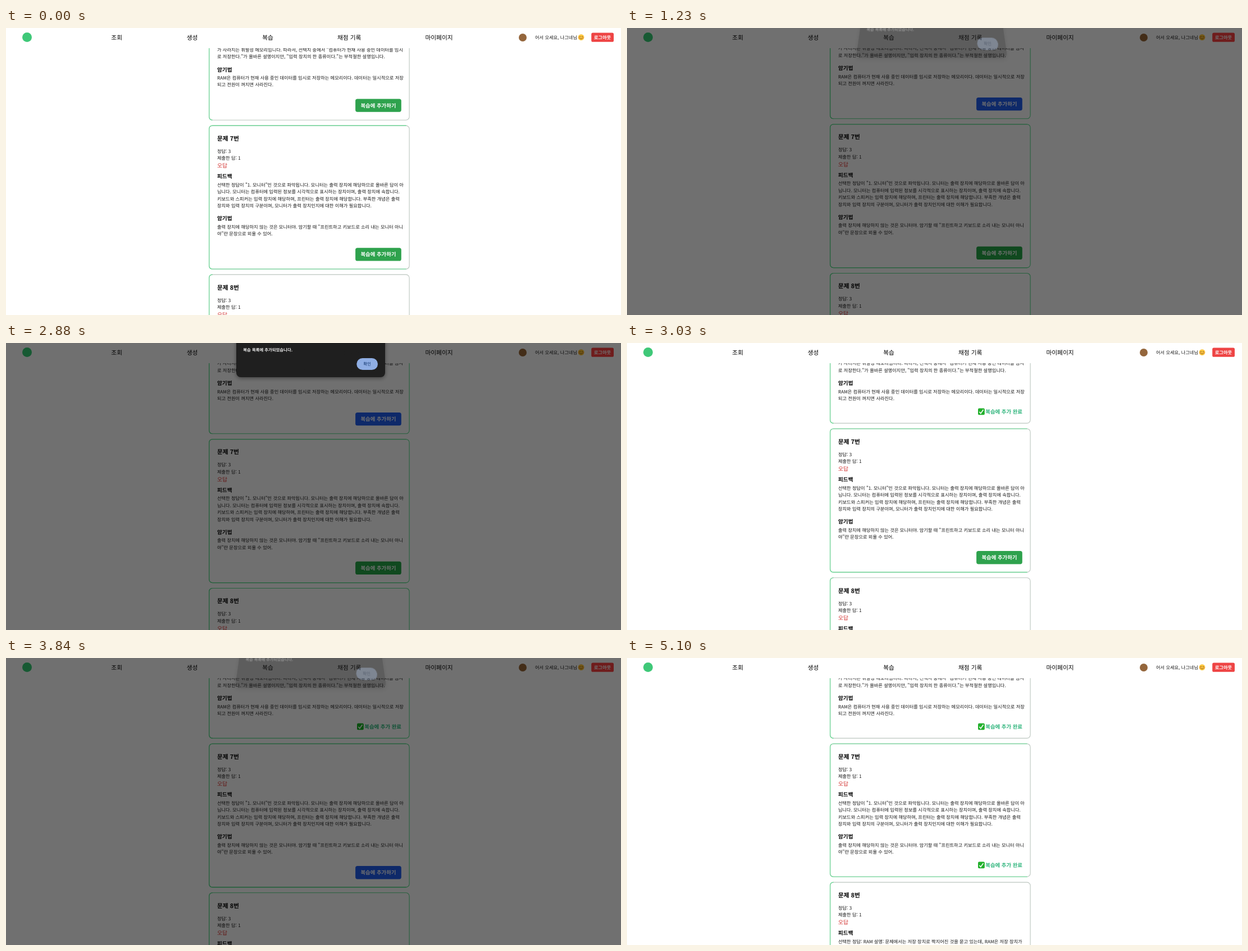
An HTML page for the animation above (6420 ms loop, 1095 px wide and 512 px high).

```html
<!DOCTYPE html>
<html lang="ko">
<head>
<meta charset="utf-8">
<title>채점 기록</title>
<style>
  html, body { margin: 0; width: 100%; height: 100%; overflow: hidden; background: #fff; }
  body, text {
    font-family: "Noto Sans CJK KR", "Noto Sans CJK JP", "Noto Sans CJK SC", "Noto Sans CJK TC", "Noto Sans CJK", sans-serif;
    text-rendering: geometricPrecision;
  }
  #page { position: absolute; left: 0; top: 0; background: #fff; --edge: #bcc6bf; }
  #page.dim { filter: brightness(.44) saturate(1.1); --edge: #62d990; }
  .body { font-size: 8.22px; fill: #181818; }
  .title { font-size: 10.7px; font-weight: 700; fill: #000; }
  .sub { font-size: 9.6px; font-weight: 700; fill: #000; }
  .wrong { font-size: 9.85px; fill: #d23230; }
  .nav { font-size: 10.7px; font-weight: 500; fill: #000; }
  .label { font-size: 9.4px; font-weight: 700; fill: #fff; }
  .done { font-size: 9.4px; font-weight: 700; fill: #2fb57c; }
  .logout { font-size: 8.3px; font-weight: 700; fill: #fff; }
  .frame { fill: none; stroke: var(--edge); stroke-width: 1.1; }
  .frame.green { stroke: #62d990; }
  #dialog {
    position: absolute; left: 410px; top: -60px; width: 264.5px; height: 120.5px;
    border-radius: 8px; background: #1f1f1f; box-shadow: 0 2px 7px #0006;
    transform-origin: 132px 106px; visibility: hidden;
  }
  #dialog svg { position: absolute; left: 0; top: 0; }
  .message { font-size: 7.36px; font-weight: 700; fill: #f2f2f2; }
  .confirm { font-size: 7.5px; font-weight: 500; fill: #0b2f68; }
</style>
</head>
<body>
<svg id="page" width="1095" height="512" viewBox="0 0 1095 512">
  <g id="cards"></g>
  <rect width="1095" height="36" fill="#fff"/>
  <circle cx="37.5" cy="16.5" r="8.5" fill="#3fc878"/>
  <g id="nav"></g>
  <circle cx="920" cy="17" r="7" fill="#94663c"/>
  <text class="body" x="942" y="19.8">어서 오세요, 나그네님</text>
  <g transform="translate(1024 16.6)" fill="none" stroke="#6b4214" stroke-width=".8" stroke-linecap="round">
    <circle r="5.4" fill="#fbc63f" stroke="none"/>
    <path d="M-3-1q1-1.6 2 0M1-1q1-1.6 2 0M-2.8 1.3q2.8 3.2 5.6 0"/>
    <path d="M-3.9.9h.6M3.3.9h.6" stroke="#f08a4b" stroke-width="1.5"/>
  </g>
  <rect x="1042.2" y="8.5" width="39.8" height="16.3" rx="2.6" fill="#ee4444"/>
  <text class="logout" x="1062" y="19.8" text-anchor="middle">로그아웃</text>
</svg>
<div id="dialog">
  <svg width="264.5" height="120.5">
    <text class="message" x="12.3" y="74.8">복습 목록에 추가되었습니다.</text>
    <rect id="pill" x="214.3" y="87" width="37.7" height="21" rx="10.5"/>
    <text class="confirm" x="233.1" y="100.4" text-anchor="middle">확인</text>
  </svg>
</div>
<script>
const LOOP = 6420, CARD_HEIGHT = 256, DONE_SHRINK = 18.7, CARD_GAP = 9.8;
const $ = id => document.getElementById(id);
const progress = (t, from, to) => Math.min(1, Math.max(0, (t - from) / (to - from)));
const smooth = p => p * p * (3 - 2 * p);
const mix = (a, b, p) => `rgb(${a.map((v, i) => Math.round(v + (b[i] - v) * p))})`;
const text = (cls, x, y, s, extra = "") => `<text class="${cls}" x="${x}" y="${y}" ${extra}>${s}</text>`;

const GREEN = [46, 162, 77], BLUE = [37, 92, 225];
const PILL = [168, 199, 250], PILL_PRESSED = [144, 175, 229];

const questions = [
  { number: 6,
    feedback: ["", "",
      '가 사라지는 휘발성 메모리입니다. 따라서, 선택지 중에서 "컴퓨터가 현재 사용 중인 데이터를 임시',
      '로 저장한다."가 올바른 설명이지만, "입력 장치의 한 종류이다."는 부적절한 설명입니다.'],
    memo: ["RAM은 컴퓨터가 현재 사용 중인 데이터를 임시로 저장하는 메모리이다. 데이터는 일시적으로 저장",
      "되고 전원이 꺼지면 사라진다."] },
  { number: 7, greenEdges: true,
    feedback: [
      '선택한 정답이 "1. 모니터"인 것으로 파악됩니다. 모니터는 출력 장치에 해당하므로 올바른 답이 아',
      "닙니다. 모니터는 컴퓨터에 입력된 정보를 시각적으로 표시하는 장치이며, 출력 장치에 속합니다.",
      "키보드와 스피커는 입력 장치에 해당하며, 프린터는 출력 장치에 해당합니다. 부족한 개념은 출력",
      "장치와 입력 장치의 구분이며, 모니터가 출력 장치인지에 대한 이해가 필요합니다."],
    memo: ['출력 장치에 해당하지 않는 것은 모니터야. 암기할 때 "프린트하고 키보드로 소리 내는 모니터 아니',
      '야"란 문장으로 외울 수 있어.'] },
  { number: 8,
    feedback: ["선택한 정답: RAM 설명: 문제에서는 저장 장치로 짝지어진 것을 묻고 있는데, RAM은 저장 장치가"],
    memo: [] }
];

const lines = (list, y) => list.map((s, i) => text("body", 376, y + i * 12.36, s)).join("");

function cardMarkup({ number, feedback, memo }) {
  return `<rect class="frame" x="361.7" y=".3" width="356.4" rx="6"/><path class="frame green"/>`
    + text("title", 376, 27.1, `문제 ${number}번`)
    + text("body", 376, 49.1, "정답: 3") + text("body", 376, 61.5, "제출한 답: 1")
    + text("wrong", 376, 75.7, "오답")
    + text("sub", 376, 94.7, "피드백") + lines(feedback, 109.1)
    + text("sub", 376, 169.7, "암기법") + lines(memo, 184.1)
    + `<g class="add"><rect x="622.1" y="218.4" width="81.7" height="23.3" rx="3.6"/>`
    + text("label", 663, 233.7, "복습에 추가하기", 'text-anchor="middle"') + `</g>`
    + `<g class="added"><rect x="625" y="210.8" width="11.8" height="11.8" rx="2" fill="#22b02c"/>`
    + `<path d="M627.4 217.2l2.4 2.8 4.6-6.6" fill="none" stroke="#fff" stroke-width="1.6"/>`
    + text("done", 704, 220.2, "복습에 추가 완료", 'text-anchor="end"') + `</g>`;
}

$("nav").innerHTML = [[197.2, "조회"], [331.6, "생성"], [466, "복습"], [611.2, "채점 기록"], [771, "마이페이지"]]
  .map(([x, s]) => text("nav", x, 20.9, s, 'text-anchor="middle"')).join("");

const cards = questions.map(q => {
  const node = document.createElementNS("http://www.w3.org/2000/svg", "g");
  node.innerHTML = cardMarkup(q);
  $("cards").append(node);
  const find = s => node.querySelector(s);
  return { node, greenEdges: q.greenEdges, outline: find("rect.frame"), accent: find("path.frame"),
    add: find(".add"), button: find(".add rect"), added: find(".added") };
});

function placeCard(card, top, done, hover) {
  const height = CARD_HEIGHT - (done ? DONE_SHRINK : 0), bottom = height + .2;
  const reach = card.greenEdges ? 345 : 0;
  card.node.setAttribute("transform", `translate(0 ${top})`);
  card.outline.setAttribute("height", bottom - .3);
  card.accent.setAttribute("d",
    `M${367.7 + reach} .3H367.7q-6 0-6 6V${bottom - 6}q0 6 6 6h${reach}`);
  card.add.style.display = done ? "none" : "";
  card.added.style.display = done ? "" : "none";
  card.button.setAttribute("fill", mix(GREEN, BLUE, hover));
  return top + height + CARD_GAP;
}

function placeDialog(opened, closing, closed, t) {
  const shown = t >= opened && t < closed;
  const dialog = $("dialog");
  dialog.style.visibility = shown ? "visible" : "hidden";
  $("page").classList.toggle("dim", t >= opened && t < closing + 30);
  if (!shown) return;
  const tilt = 1 - progress(t, opened, opened + 120);
  dialog.style.opacity = (1 - .76 * tilt) * (1 - progress(t, closing, closed));
  dialog.style.transform = tilt
    ? `translateY(${-9 * tilt}px) scaleY(${1 + .1 * tilt}) perspective(225px) rotateX(${15 * tilt}deg)`
    : "none";
}

function draw(t) {
  const scroll = 2.4 * smooth(progress(t, 180, 330));
  const done = [t >= 3030, t >= 5100, false];
  const hover = [smooth(progress(t, 665, 840)), smooth(progress(t, 3455, 3630)), 0];
  let top = -92 - scroll;
  cards.forEach((card, i) => { top = placeCard(card, top, done[i], hover[i]); });

  const press = t < 3030
    ? .45 * progress(t, 1925, 2100) + .25 * progress(t, 2225, 2340) + .3 * progress(t, 2765, 2880)
    : progress(t, 4770, 4920);
  $("pill").setAttribute("fill", mix(PILL, PILL_PRESSED, press));
  if (t < 3030) placeDialog(1230, 2880, 3030, t);
  else placeDialog(3840, 4950, 5100, t);
}

function tick(now) {
  draw(now % LOOP);
  requestAnimationFrame(tick);
}
draw(0);
requestAnimationFrame(tick);
</script>
</body>
</html>
```
